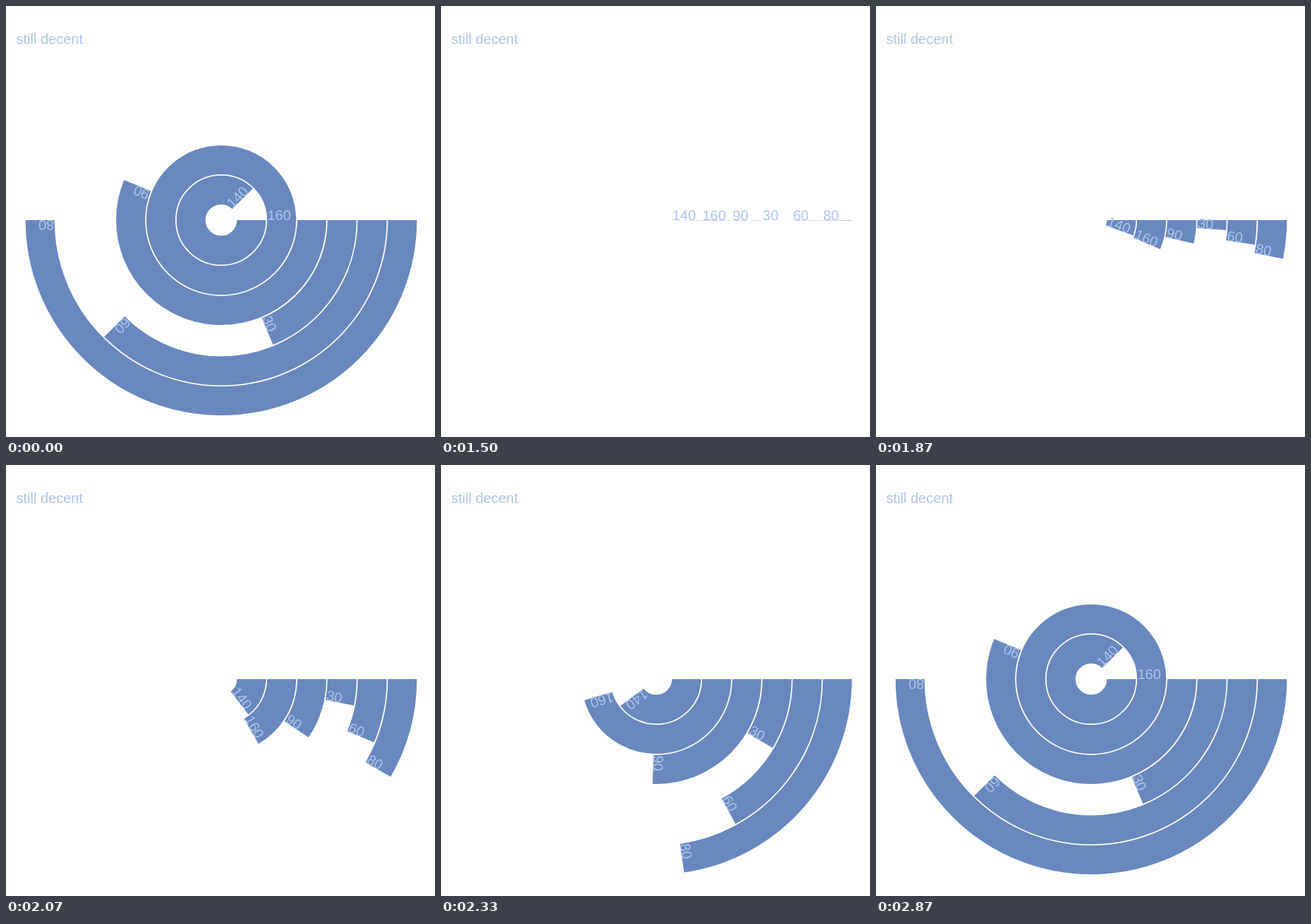
Write an HTML page that moves like this. It is 608x612 px and loops after 3.39 s.

```html
<!DOCTYPE html>
<html lang="en">
<head>
<meta charset="utf-8">
<title>Radial bars</title>
<style>
  html, body { margin: 0; width: 100%; height: 100%; overflow: hidden; background: #fdfdfd; }
  svg { display: block; }
  text { font: 20px "Liberation Sans", Arial, sans-serif; fill: #aec4ea; }
  circle { fill: none; stroke: #6888be; }
</style>
</head>
<body>
<svg id="stage" width="608" height="612" viewBox="0 0 608 612">
  <text x="14.5" y="54">still decent</text>
  <g id="chart" transform="translate(305 304)"></g>
</svg>
<script>
const LOOP = 3390;
const STEP = 1000 / 30;
const VALUES = [140, 160, 90, 30, 60, 80];
const INNER = 22.3, PITCH = 42.8, BAND = 41;
const DEG_PER_UNIT = 360 / 160;

// Tick on the 30 fps clock -> linear progress of the sweep
const CLOCK = [[45, 0.03], [56, 0.351], [62, 0.553], [70, 0.838], [75, 1]];

const chart = document.getElementById('chart');

function add(name, attrs) {
  const el = document.createElementNS('http://www.w3.org/2000/svg', name);
  for (const key in attrs) el.setAttribute(key, attrs[key]);
  return chart.appendChild(el);
}

const arcs = VALUES.map((v, i) => add('circle', {
  r: INNER + PITCH * i + BAND / 2,
  'stroke-width': BAND,
  pathLength: 360
}));

const labels = VALUES.map((v, i) => {
  const label = add('text', { x: INNER + PITCH * i + 0.4 });
  label.textContent = v;
  return label;
});

function progress(tick) {
  if (tick < CLOCK[0][0]) return 1;
  for (let i = 1; i < CLOCK.length; i++) {
    const [k0, t0] = CLOCK[i - 1], [k1, t1] = CLOCK[i];
    if (tick < k1) return t0 + (t1 - t0) * (tick - k0) / (k1 - k0);
  }
  return 1;
}

const circleIn = t => 1 - Math.sqrt(1 - t * t);

function render(ms) {
  const tick = Math.floor((ms % LOOP + 5) / STEP);
  const p = circleIn(progress(tick));
  VALUES.forEach((v, i) => {
    const angle = v * DEG_PER_UNIT * p;
    arcs[i].setAttribute('stroke-dasharray', angle >= 360 ? 'none' : angle + ' 360');
    labels[i].setAttribute('transform', `rotate(${angle})`);
  });
}

const start = performance.now();
function loop() {
  render(performance.now() - start);
  requestAnimationFrame(loop);
}
loop();
</script>
</body>
</html>
```
